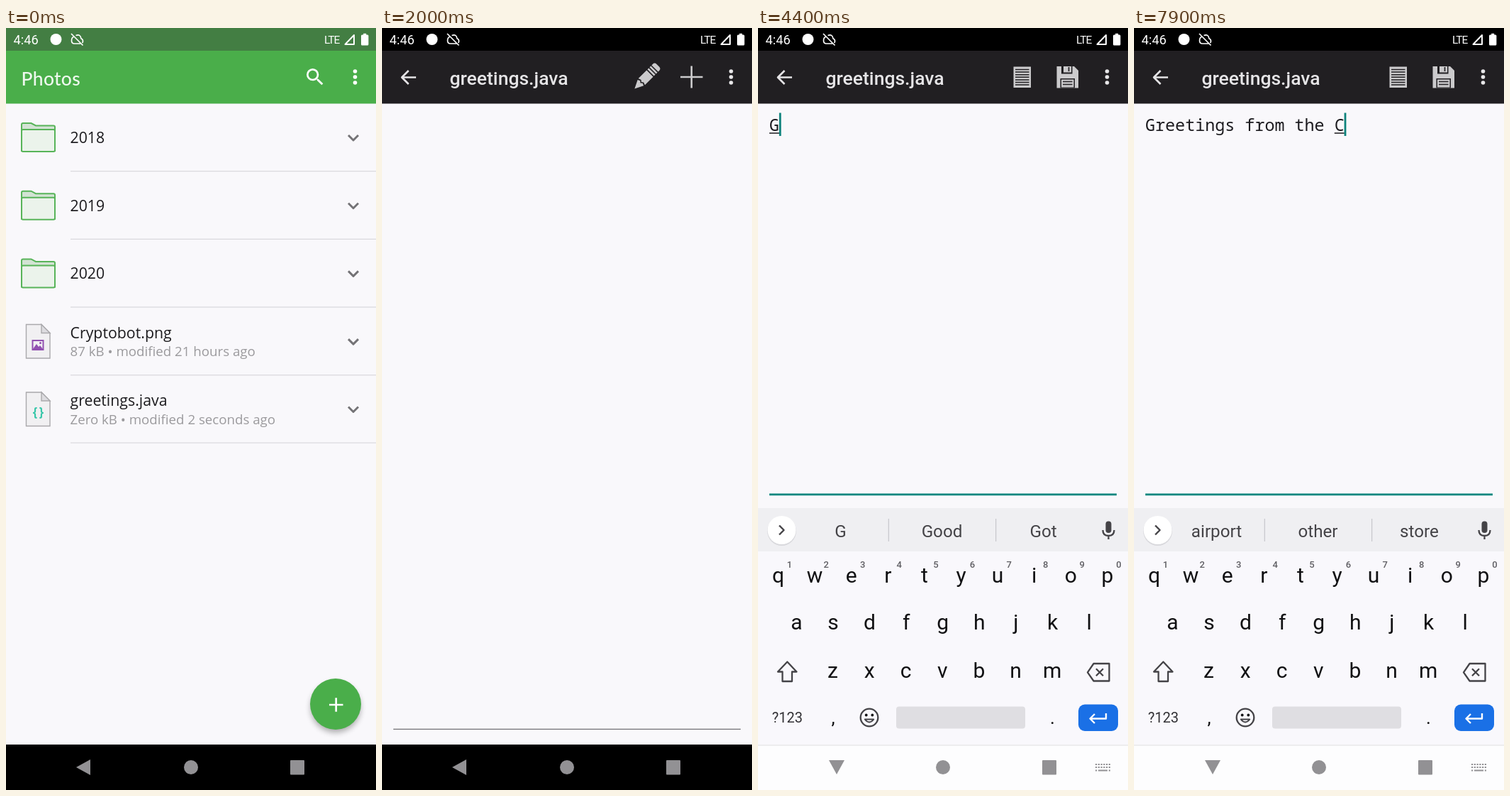
Write an HTML page that moves like this. It is 522x1073 px and loops after 8000 ms.

```html
<!DOCTYPE html>
<html lang="en">
<head>
<meta charset="utf-8">
<title>File editor</title>
<style>
  html, body { margin: 0; width: 100%; height: 100%; overflow: hidden; background: #000; }
  svg { display: block; width: 100%; height: 100%; }
  text { white-space: pre; }
  .list { font-family: "Open Sans", "Noto Sans", sans-serif; }
  .name { font-size: 21.3px; fill: #1c1b1e; }
  .info { font-size: 18.7px; fill: #9b9a9d; }
  .ui { font-family: Roboto, sans-serif; }
  .mid { text-anchor: middle; }
  .mono { font-family: "Noto Sans Mono", "DejaVu Sans Mono", monospace; }
  .line { fill: none; stroke-linejoin: round; }
</style>
</head>
<body>
<svg viewBox="0 0 522 1073">
  <defs>
    <clipPath id="rowClip"><rect y="489" width="522" height="95.5"/></clipPath>
    <clipPath id="openClip"><rect id="openRect" width="522" height="1073"/></clipPath>
    <filter id="soft" x="-30%" y="-30%" width="160%" height="160%"><feGaussianBlur stdDeviation="4"/></filter>
    <g id="folder">
      <path d="M-23 19V-18q0-2 2-2h11.500l6.500 3.500H22q2 0 2 2V19z" fill="#d3e3d4" stroke="#58b459" stroke-width="2"/>
      <rect x="-23" y="-11" width="47" height="31" rx="2" fill="#ebf3eb" stroke="#58b459" stroke-width="2"/>
    </g>
    <g id="file" stroke="#aaa9ac" stroke-width="1.400">
      <path d="M-16.500-24H5L17-12V23.500H-16.500z" fill="#f1f0f2"/>
      <path d="M5-24V-12H17z" fill="#dddce0"/>
    </g>
    <path id="down" class="line" d="M-7-3.500 0 3.500 7-3.500" stroke="#747376" stroke-width="2.900" stroke-linejoin="miter"/>
    <path id="find" d="M15.500 14h-.79l-.28-.27A6.470 6.470 0 0 0 16 9.500 6.500 6.500 0 1 0 9.500 16c1.610 0 3.090-.59 4.230-1.570l.27.28v.79l5 4.990L20.490 19zM9.500 14a4.500 4.500 0 1 1 0-9 4.500 4.500 0 0 1 0 9z"/>
    <g id="more"><circle cx="492.500" cy="61" r="2.800"/><circle cx="492.500" cy="69" r="2.800"/><circle cx="492.500" cy="77" r="2.800"/></g>
  </defs>

  <!-- file list -->
  <g id="files">
    <rect width="522" height="1073" fill="#f9f8fb"/>
    <rect width="522" height="32" fill="#437e43"/>
    <rect y="32" width="522" height="74.500" fill="#4aae4a"/>
    <text x="21.500" y="80.500" font-family="Lato, sans-serif" font-size="26.500" font-weight="500" letter-spacing=".3" fill="#eef8ee">Photos</text>
    <use href="#find" transform="translate(420 53) scale(1.333)" fill="#fff"/>
    <use href="#more" fill="#fff"/>
    <g id="rows" class="list"></g>
    <g clip-path="url(#rowClip)">
      <rect id="rowBg" y="489" width="522" height="96" fill="#fdfcfe"/>
      <circle id="ripple" cx="172" cy="548" fill="#000"/>
    </g>
    <g id="lastRow" class="list">
      <use href="#file" x="45" y="537"/>
      <text x="45" y="547" class="mono mid" font-size="17" font-weight="700" letter-spacing="-1" fill="#35c6a8">{}</text>
      <text id="lastName" x="90.500" class="name">greetings.java</text>
      <g id="idle">
        <text x="90.500" y="558" class="info">Zero kB • modified 2 seconds ago</text>
        <use href="#down" x="490" y="537"/>
      </g>
      <g id="busy">
        <path d="M98 543h6v6h4l-7 7-7-7h4zM94 557.500h14v2H94z" fill="#a9a8ab"/>
        <rect x="122.500" y="547.500" width="272" height="5" fill="#c8c7ca"/>
      </g>
    </g>
    <rect x="91" y="583.500" width="431" height="1.300" fill="#dddce0"/>
    <circle cx="465" cy="957" r="35" opacity=".32" filter="url(#soft)"/>
    <circle cx="465" cy="952" r="36" fill="#4aae4a"/>
    <path d="M456 953h19.500M465.700 943.300v19.500" stroke="#fff" stroke-width="2.700"/>
  </g>

  <!-- editor -->
  <g clip-path="url(#openClip)">
    <g id="editor">
      <rect width="522" height="1073" fill="#f9f8fb"/>
      <rect width="522" height="32"/>
      <rect y="32" width="522" height="74.500" fill="#211f22"/>
      <path class="line" d="M48 69.500H28.500M37.500 60 28 69.500 37.500 79" stroke="#e4e3e5" stroke-width="2.600" stroke-linejoin="miter"/>
      <text x="95.500" y="80" class="ui" font-size="26.500" font-weight="500" fill="#e6e5e7">greetings.java</text>
      <g id="pencil" transform="translate(373 69) rotate(45)" fill="#cbcacc">
        <path d="M-6.500-17v-2q0-4 4-4h5q4 0 4 4v2zM-6.500-15.500h13v2.700h-13zM-6.500-11.300h13v2.700h-13zM-6.500-7h13v16.500l-4-1.500-2.500 2-2.500-2-4 1.500zM-6 11.500l3.500-1.500 2.500 2 2.500-2 3.500 1.500-6 12z"/>
      </g>
      <g id="page">
        <rect x="360.500" y="54.500" width="24.500" height="29.500" fill="#cbcacc"/>
        <path id="pageLines" stroke="#211f22" stroke-width="1.500"/>
      </g>
      <path id="plus" d="M421 69h31.500M436.700 53.500v31" stroke="#cbcacc" stroke-width="2.600"/>
      <g id="save">
        <path d="M421.500 54H446l6 6v24.500h-30.500z" fill="#cbcacc"/>
        <path d="M428 54v10.500h15.500V54M426.500 71h20.500v13.500h-20.500z" fill="#211f22"/>
        <path d="M431 54v8.500h11V54zM428 72.500h17.500v11H428z" fill="#cbcacc"/>
        <path d="M438.500 55v6M430 75.500h13.500M430 79.500h13.500" stroke="#211f22" stroke-width="1.700"/>
      </g>
      <use href="#more" fill="#e8e7e9"/>
      <rect id="base" x="16" width="490"/>
      <text id="typed" x="16" y="145" class="mono" font-size="23.400" fill="#1d1c20"></text>
      <rect id="under" y="147.300" height="1.500" fill="#1d1c20"/>
      <rect id="caret" y="119.500" width="2.800" height="32.500" fill="#0d827b"/>
    </g>
  </g>

  <!-- status bar -->
  <g class="ui" fill="#fff">
    <text x="10.500" y="23" font-size="18.300">4:46</text>
    <circle cx="70.500" cy="16" r="8"/>
    <path class="line" d="M95.500 12.500q-3 1-3 5.300 0 4.200 4 4.200h8.500M98.500 10.500q6.500-2.500 7.500 4.500 2.500.6 2.500 3.500 0 1.500-1 2.500M92 8l16.500 16.500" stroke="#fff" stroke-width="1.700"/>
    <text x="449" y="22" font-size="15.500" letter-spacing="-1">LTE</text>
    <path class="line" d="M478.500 23H491V10z" stroke="#fff" stroke-width="2" stroke-linejoin="miter"/>
    <path d="M501 11q0-1.500 1.500-1.500h1.700V7.700h4v1.800h1.700q1.500 0 1.500 1.500v12q0 1.500-1.500 1.500h-7.400q-1.500 0-1.500-1.500z"/>
  </g>

  <!-- keyboard and navigation -->
  <rect y="1009" width="522" height="64"/>
  <g id="board" class="ui" fill="#101012">
    <rect y="676" width="522" height="397" fill="#f9f8fc"/>
    <rect y="676" width="522" height="61" fill="#efeff2"/>
    <rect y="1009.500" width="522" height="64" fill="#fdfdfe"/>
    <rect y="1009.500" width="522" height="1" fill="#dfdfe2"/>
    <circle cx="33.500" cy="708.500" r="20.500" fill="#d9d9dd"/>
    <circle cx="33.500" cy="707" r="20" fill="#fff"/>
    <path id="fold" class="line" stroke="#444347" stroke-width="2.400"/>
    <g id="tools" fill="#444347">
      <use href="#find" transform="translate(87 692) scale(1.333)"/>
      <path class="line" d="M168.500 697h17q2 0 2 2v11l-8 8h-11q-2 0-2-2v-17q0-2 2-2zM179.500 718v-6q0-2 2-2h6M171 708q2 5 6.500 4" stroke="#444347" stroke-width="2.200"/>
      <circle cx="172.500" cy="703.500" r="1.700"/><circle cx="181.500" cy="703.500" r="1.700"/>
      <text x="251" y="713.500" class="mid" font-size="19" font-weight="900" letter-spacing=".4">GIF</text>
      <path class="line" d="M318.500 698h17v20.500h-17zM322 704.500h10M322 709h10M322 713.500h7" stroke="#444347" stroke-width="2.200"/>
      <path d="M322 695h10v5h-10z"/>
      <path d="M373 691.500h1v30h-1z" fill="#bdbdc2"/>
      <circle cx="411.500" cy="707.500" r="2.900"/><circle cx="420.300" cy="707.500" r="2.900"/><circle cx="429" cy="707.500" r="2.900"/>
    </g>
    <g id="words" class="mid" font-size="24.200" fill="#444347">
      <text x="116.500" y="716.500"></text><text x="259.500" y="716.500"></text><text x="402.500" y="716.500"></text>
      <path d="M183.700 691h1.200v32h-1.200zM335 691h1.200v32H335z" fill="#c6c6cb"/>
    </g>
    <rect x="490.500" y="694.500" width="8" height="16.500" rx="4" fill="#444347"/>
    <path class="line" d="M486.500 707q0 8 8 8t8-8M494.500 715v5" stroke="#444347" stroke-width="2.300"/>
    <g id="keys" class="mid" font-size="30"></g>
    <path class="line" d="M41.300 892.500 54.500 906.500H48V920H34.500V906.500H28z" stroke="#444347" stroke-width="2.300"/>
    <path class="line" d="M473.500 895H495.500V919.500H473.500L465 907.300zM477 902.300l10 10M487 902.300l-10 10" stroke="#444347" stroke-width="2.300"/>
    <text x="41.300" y="978" class="mid" font-size="20" fill="#333236">?123</text>
    <text x="106" y="979.500" class="mid" font-size="26">,</text>
    <text x="415.500" y="979.500" class="mid" font-size="26">.</text>
    <circle class="line" cx="157" cy="971" r="12.300" stroke="#444347" stroke-width="2.300"/>
    <circle cx="152.700" cy="967.500" r="1.900"/><circle cx="161.300" cy="967.500" r="1.900"/>
    <path class="line" d="M150.800 973.500q6.200 8 12.400 0z" stroke="#444347" stroke-width="2"/>
    <rect x="195" y="955.500" width="182" height="31" rx="4" fill="#dfdee2"/>
    <rect x="452" y="952.500" width="56" height="37.500" rx="9" fill="#1a70e6"/>
    <path class="line" d="M491 965v7.500H469M475 966l-6.500 6.500 6.500 6.500" stroke="#fff" stroke-width="2.400" stroke-linejoin="miter"/>
  </g>
  <g fill="#929194">
    <path id="back" d="M99 1041 119 1030V1052z"/>
    <circle cx="261" cy="1041" r="10"/>
    <rect x="401" y="1031" width="20" height="20.500" rx="1"/>
    <path id="switcher" class="line" d="M476 1037h21M476 1041h21" stroke="#929194" stroke-width="2" stroke-dasharray="2.200 1.560"/>
    <path id="switcher2" d="M476 1044.500h2.200v2H476zM480 1044.500h13v2h-13zM494.800 1044.500h2.200v2h-2.200z"/>
  </g>
</svg>
<script>
const LOOP = 8000, CHAR = 14.04;
const el = Object.fromEntries([...document.querySelectorAll('[id]')].map(n => [n.id, n]));
const set = (node, attrs) => { for (const k in attrs) node.setAttribute(k, attrs[k]); };
const show = (node, on) => { node.style.display = on ? '' : 'none'; };

// last entry whose time has come
const step = (t, table) => table.reduce((best, row) => row[0] <= t ? row : best);

// straight lines between [time, value] points
function glide(t, pts) {
  if (t <= pts[0][0]) return pts[0][1];
  for (let i = 1; i < pts.length; i++) {
    const [a, from] = pts[i - 1], [b, to] = pts[i];
    if (t < b) return from + (to - from) * (t - a) / (b - a);
  }
  return pts[pts.length - 1][1];
}

// static parts
let rows = '';
['2018', '2019', '2020', 'Cryptobot.png'].forEach((name, i) => {
  const y = 154.5 + 95.7 * i, image = i === 3;
  rows += image
    ? `<use href="#file" x="45" y="441.500"/><path d="M36.500 439h17v15h-17zM38.500 441v11h13v-11z" fill="#9150b0" fill-rule="evenodd"/>
       <path d="M38 452l5-7 3 4 2-2 4 5z" fill="#9150b0"/><circle cx="48.500" cy="443.500" r="1.500" fill="#9150b0"/>
       <text x="90.500" y="462" class="info">87 kB • modified 21 hours ago</text>`
    : `<use href="#folder" x="45" y="${y - .5}"/>`;
  rows += `<text x="90.500" y="${image ? 436.5 : y + 7.5}" class="name">${name}</text>
    <use href="#down" x="490" y="${y}"/><rect x="91" y="${y + 46.5}" width="431" height="1.300" fill="#dbdade"/>`;
});
el.rows.innerHTML = rows;

let keys = '';
[['qwertyuiop', 28.5, 780.5], ['asdfghjkl', 54.3, 847], ['zxcvbnm', 105.5, 914.5]].forEach(([letters, x, y], r) => {
  [...letters].forEach((c, i) => {
    const kx = x + 51.6 * i;
    keys += `<text x="${kx}" y="${y}">${c}</text>`;
    if (!r) keys += `<text x="${kx + 16}" y="759.500" font-size="13" font-weight="500" fill="#5f5e63">${(i + 1) % 10}</text>`;
  });
});
el.keys.innerHTML = keys;
set(el.pageLines, { d: Array.from({ length: 7 }, (_, i) => `M363 ${58.5 + 3.6 * i}h19.500`).join('') });

// time, text, underline start, underline length
const typing = [
  [0, '', 0, 0], [4200, 'G', 0, 1], [4600, 'Gr', 0, 2], [4800, 'Gre', 0, 3], [5000, 'Gree', 0, 4],
  [5100, 'Greet', 0, 5], [5300, 'Greeti', 0, 6], [5400, 'Greetin', 0, 7], [5500, 'Greeting', 0, 8],
  [5700, 'Greetings', 0, 9], [5900, 'Greetings ', 0, 0], [6200, 'Greetings f', 10, 1],
  [6400, 'Greetings fr', 10, 2], [6600, 'Greetings fro', 10, 3], [6800, 'Greetings from ', 10, 3],
  [6900, 'Greetings from ', 0, 0], [7000, 'Greetings from t', 15, 1], [7200, 'Greetings from th', 15, 2],
  [7400, 'Greetings from the', 15, 3], [7500, 'Greetings from the ', 0, 0], [7800, 'Greetings from the C', 19, 1]
];
const hints = [
  [0, ''], [4300, 'G Good Got'], [4700, 'Gr Great Green'], [4900, 'Gre Great Green'], [5300, 'Greet Greeting Greetings'],
  [5600, 'Greeting Greetings Greeting’s'], [5900, 'from to and'], [6500, 'fr from for'], [6700, 'fro from for'],
  [6900, 'the my a'], [7200, 'the this to'], [7600, 'airport other store']
];

function draw(t) {
  // row press
  const loading = t >= 1100;
  show(el.rowBg, loading);
  show(el.busy, loading);
  show(el.idle, !loading);
  set(el.lastName, { y: loading ? 534 : 532 });
  set(el.lastRow, { opacity: loading ? .5 : 1 });
  set(el.ripple, {
    r: glide(t, [[1000, 0], [1100, 85], [1200, 180], [1400, 365]]),
    opacity: glide(t, [[1000, .04], [1100, .07], [1400, .07], [1600, 0]])
  });

  // editor opens from below
  const open = glide(t, [[1500, 0], [1600, .25], [1700, .72], [1800, .93], [1900, 1]]);
  const top = 1009 * (1 - open);
  set(el.openRect, { y: top, height: 1073 - top });
  set(el.editor, { transform: `translate(0 ${44 * (1 - open)})` });

  // edit mode
  const edit = t >= 3200, focus = t >= 3300;
  const [, text, from, len] = step(t, typing);
  show(el.pencil, !edit);
  show(el.page, edit);
  show(el.plus, !text);
  show(el.save, text);
  set(el.base, focus ? { y: 655.5, height: 2.8, fill: '#0d877f' } : { y: 986.7, height: 1.4, fill: '#7b7a7d' });
  el.typed.textContent = text;
  set(el.under, { x: 16 + from * CHAR, width: len * CHAR });
  show(el.caret, focus);
  set(el.caret, { x: 15.8 + text.length * CHAR });

  // keyboard
  const alpha = glide(t, [[3250, 0], [3300, .2], [3400, .5], [3500, .8], [3600, 1]]);
  const drop = glide(t, [[3250, 300], [3300, 220], [3400, 104], [3500, 38], [3600, 9], [3700, 0]]);
  set(el.board, { opacity: alpha, transform: `translate(0 ${drop})` });
  set(el.switcher, { opacity: alpha ? 1 : 0 });
  set(el.switcher2, { opacity: alpha ? 1 : 0 });
  const turn = glide(t, [[3300, 0], [3400, -6], [3500, -40], [3600, -75], [3700, -90]]);
  set(el.back, { transform: `rotate(${turn} 110 1040)` });

  const hint = step(t, hints)[1], words = hint.split(' ');
  show(el.tools, !hint);
  show(el.words, hint);
  el.words.querySelectorAll('text').forEach((n, i) => { n.textContent = words[i] || ''; });
  set(el.fold, { d: hint ? 'M30 700.500 36.500 707 30 713.500' : 'M37 700.500 30.500 707 37 713.500' });
}

const start = performance.now();
function tick() {
  draw((performance.now() - start) % LOOP);
  requestAnimationFrame(tick);
}
tick();
</script>
</body>
</html>
```
